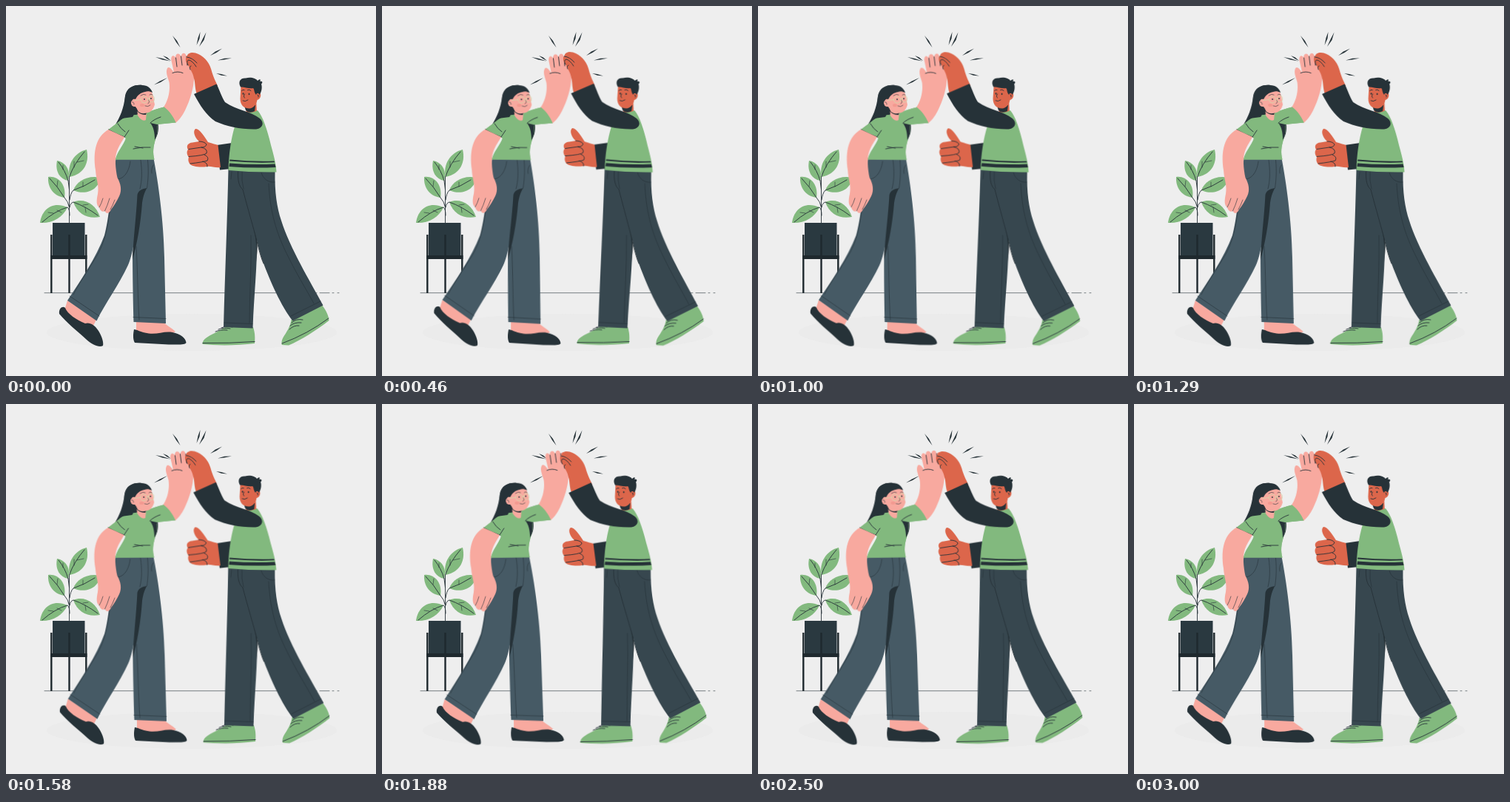
These frames come from a looping animation (500 px wide and 500 px high, 3.04 s). An HTML page:

```html
<!DOCTYPE html>
<html lang="en">
<head>
<meta charset="utf-8">
<title>High five</title>
<style>
html, body { margin: 0; width: 100%; height: 100%; overflow: hidden; background: #eee; }
svg { display: block; width: 100vw; height: 100vh; }
.sway { transform-box: view-box; }
.ink { fill: #263238; }
.line { fill: none; stroke: #263238; stroke-width: .9; stroke-linecap: round; stroke-linejoin: round; }
.thin { stroke-width: .6; }
.green { fill: #82b97e; }
.pink { fill: #f8a99f; }
.tan { fill: #dc664b; }
.denim { fill: #465a65; }
.slate { fill: #37474f; }
.stand { fill: none; stroke: #1f292e; stroke-width: 2.4; }
</style>
</head>
<body>
<svg viewBox="0 0 500 500">
  <defs>
    <pattern id="dots" width="13" height="12" patternUnits="userSpaceOnUse" patternTransform="rotate(12)">
      <g fill="none" stroke="#d3ebc9" stroke-width=".9">
        <circle cx="3" cy="3" r="1.5"/>
        <circle cx="9.5" cy="8.5" r="1.5"/>
      </g>
      <g fill="#c2e0b8">
        <circle cx="9.5" cy="2" r=".6"/>
        <circle cx="3.5" cy="8.8" r=".6"/>
      </g>
    </pattern>
  </defs>

  <ellipse cx="251" cy="441" rx="196" ry="25" fill="#ebebeb"/>
  <path class="line thin" d="M52 387.7H420M424 387.7H437M441 387.7H443M448 387.7H450"/>

  <g id="plant">
    <g class="green">
      <path d="M86 231C82 215 92 198 109 194C113 211 106 227 86 231Z"/>
      <path d="M69 209C80 211 88 221 84 236C73 234 66 224 69 209Z"/>
      <path d="M57 231C70 229 82 241 79 259C65 257 56 246 57 231Z"/>
      <path d="M91 249C95 237 111 228 127 232C126 247 109 257 91 249Z"/>
      <path d="M46 293C48 275 63 263 83 272C77 286 62 294 46 293Z"/>
      <path d="M91 265C105 259 121 267 127 285C111 288 97 282 91 265Z"/>
    </g>
    <path class="line" d="M85.500 293V231Q92 213 106 197M84 236Q80 222 71 211M85.500 248L84 236M85.500 272Q84 264 79 259Q70 244 59 233M86 262Q87 253 91 249Q106 244 120 235M86 283Q86 274 83 272Q66 277 49 292M86 272Q87 266 91 265Q108 271 124 283"/>
    <path class="line thin" d="M92 218L92 210M96 211L105 209M77 221L77 215M69 244L70 236M64 280L57 279M69 276L75 279M104 269L111 268M107 272L108 279M104 244L104 238"/>
    <rect x="63" y="293" width="43.500" height="44" fill="#2a3940"/>
    <path class="stand" d="M61.300 309V388M108.300 309V388M85.500 309V388"/>
    <path class="stand" d="M60 339.500H109.500" style="stroke-width:5"/>
  </g>

  <g id="sparks" class="ink">
    <path d="M202 69L212 71L222 74.500L211 72.500ZM212 67L218 69.500L223 74L217 71Z"/>
    <path d="M200 106.500L208 101.500L218 97L209 103Z"/>
    <path d="M225 40L231 47L235.500 56L230 49Z"/>
    <path d="M262.500 35L261.500 44L257.500 53L259.500 43ZM270.500 35.500L267.500 46L261 55L265.500 45Z"/>
    <path d="M276 67L283 61.500L292 57.500L284.500 63Z"/>
    <path d="M286 73.500L295 70.800L305 70.500L295 72.500Z"/>
    <path d="M284 91L291 92L299 94.500L291 93.700Z"/>
  </g>

  <g class="sway" data-pivot="162 262"><g transform="rotate(-.12 162 262)">
    <!-- hair behind -->
    <path class="ink" d="M184 107C173 106 163 110 161 122C159 139 154 150 148 160C156 160 164 156 176 149L196 152C199 160 201 170 201 181C206 174 207 164 205 157L190 146L180 110Z"/>

    <!-- feet -->
    <path class="pink" d="M83 398L122 424L117 434L100 430L79 411Z"/>
    <path class="ink" d="M72 416C71 408 77 405 80 408C83 416 95 424 107 429C113 427 120 431 125 439C130 447 132 455 131 459C126 462 117 458 109 451C97 440 82 428 72 416Z"/>
    <path class="pink" d="M176 426L213 427C217 432 224 435 229 440L220 445L176 443Z"/>
    <path class="ink" d="M173 437C177 437 181 441 193 442.500C205 444 214 439 225 441C236 443 243 449 243.500 455C242 458 236 457.500 220 457.500L174 455C171 450 172 442 173 437Z"/>

    <!-- trousers -->
    <path class="denim" d="M160 206H199.500C206 240 213 290 214 340L216 429L172.500 427C171.500 390 171 350 171 336L178 250Z"/>
    <path class="denim" d="M148.500 206C142 250 139 288 133 310C122 340 100 372 83 398L122.500 425.500C135 400 152 378 165 350C171 337 175 310 178 288L184 246L186 206Z"/>
    <path class="ink" d="M190.500 246C184 247 179 249 177.500 255C176 285 172 314 171 343C177 322 182 294 184 266C185.500 256 188 250 190.500 246Z"/>
    <path class="line thin" d="M182 208C184 222 184 236 181 247M191.500 208C193 224 192 236 190.500 246M150 234C158 234 166 226 168 210M143 252C139 290 136 318 120 342C108 362 98 376 91 390M86 392L126 419M172 420.500L216 422.500M176 325C178 360 178 395 180 424M199 215Q196 219 197 226"/>

    <!-- raised arm -->
    <path class="pink" d="M212 138C220 127 222 113 220.500 103C219 97 215 90 218 84C221 81 224 86 227 90L223.500 74C222 67 227 65 229 70C229 63 235 63 236.500 69C237 62 243 62 244 69C245 64 251 66 251.500 73L254 92C255 108 249 127 242 141C238 149 234 154 229 158Z"/>
    <path class="line" d="M225 90.500Q232 87.500 239 90.500M229.500 70L231 82M236.500 68L238 80M244 68L245 80"/>

    <!-- top -->
    <g id="top">
      <path id="blouse" class="green" d="M176 147C166 148 158 151 153 156L138.500 167C145 172 153 175 160 177L162 179C158 190 150 197 148 207.500H200.500C198 198 199 190 202 180C205 172 205 165 204 160L229.500 157.500C226 150 221 142 213.500 136.500C206 138 198 141 191 144Z"/>
      <use href="#blouse" style="fill:url(#dots)"/>
    </g>
    <path class="line" d="M172 193Q184 190 195 191M174 190Q180 191 185 192M151 159Q155 166 161 170M138.500 167Q149 173 160 177M160 177L166 168M209 150Q200 153 195 158"/>
    <path class="ink" d="M195 158L204 160C205 168 205 174 201 181C201 170 199 163 195 158Z"/>

    <!-- lowered arm -->
    <path class="pink" d="M138.500 167C122 176 117 196 121 222C122 236 126 242 124 254C122 263 122 270 126 272C127 277 131 279 133.500 277C136 282 140 280 142 275C146 270 150 263 153 257C157 249 155 240 150.500 232C148 220 146.500 205 150 196C153 188 157 183 160 177Z"/>
    <path class="line thin" d="M131 260Q129 267 126 272M140 260Q137 270 133.500 277M147 262Q144 270 141 275"/>

    <!-- head -->
    <path class="pink" d="M177 138L178 148Q184 157 189 154L190 143Z"/>
    <path class="ink" d="M176 138L179 143Q185 147 190 144L189 147Q181 147 177 142Z"/>
    <path class="pink" d="M175 115L196 115C200 121 199.500 128 201 133C199 141 194 145 188 144.500C182 144 177 140 175 136C169 137 167 130 171 127Z"/>
    <path class="ink" d="M161 122C163 110 174 106 184 107C191 107 196 111 198 117C194 115 191 115 188 116C182 117 178 120 175 126C171 125 168 128 169 132C171 137 172 139 174 140C173 144 173 148 171 150L156 152C160 140 160 132 161 122Z"/>
    <path class="line thin" d="M170.500 130Q173 129 173 133M182 121Q186 118 189 120M194 120Q196 118 198 120M193 127Q195 130 192 132M188 135Q192 137 195 134"/>
    <circle class="ink" cx="187" cy="126" r=".9"/>
    <circle class="ink" cx="196" cy="125" r=".9"/>
    <g fill="none" stroke="#d6d6ab" stroke-width=".9">
      <circle cx="187" cy="126.500" r="4.500"/>
      <ellipse cx="197" cy="125.500" rx="3.500" ry="4.300"/>
      <path d="M174 127.500L182.500 126.500M191.500 125.500L193.500 125"/>
    </g>
    <ellipse cx="184" cy="134" rx="3" ry="2" fill="#ee8d84" opacity=".55"/>
  </g></g>

  <g class="sway" data-pivot="340 260"><g transform="rotate(-.12 340 260)">
    <!-- shoes -->
    <g class="green">
      <path d="M265.500 457C265 450 274 446 282 442L298 433L334 434C337 443 336.500 450 336 456C312 459 285 459 265.500 457Z"/>
      <path d="M373 458C370 448 383 441 385.500 424L427 404C433 412 436 419 436.500 425C420 438 398 452 382 458.500Z"/>
    </g>
    <path class="line" d="M266 455.500Q302 456 336 453.500M373 456Q408 443 436 422M283 440Q290 437 299 438M287 437Q294 434 303 436M291 435Q297 432 306 434M384 432Q390 427 399 428M386 428Q392 422 401 424M383 437Q389 431 396 432"/>

    <!-- trousers -->
    <path class="slate" d="M300.500 220C299 290 296 360 294 434L333.500 435.500C335 390 340 350 339 310L350 222Z"/>
    <path class="slate" d="M314 222L363.500 224C363 252 366 272 372 290C384 328 410 370 428.500 404.500L387.500 425.500C372 406 357 372 347 345C340 325 336 300 322 247Z"/>
    <path class="line" d="M313.500 224C313 236 315 244 320 248C327 275 334 298 339 318Q344 339 348 348"/>
    <path class="ink" d="M335 302L339.500 319C340 330 339 338 338 346C339 330 338 315 335 302Z"/>
    <path class="line thin" d="M345 225C347 233 354 239 363 238M319 224Q318 236 321 247M305 224L304 234M295 428L333 429.500M385 419L425 399M331 310C332 350 329 390 329 428M355 240C357 285 369 315 383 342C396 368 407 385 416 402"/>

    <!-- thumb up -->
    <path class="ink" d="M285 188L309 184.500L304 220L289 221.500Z"/>
    <path class="tan" d="M256 166C261 165 268 176 273 184C279 186 284 187 286.500 188L290 218C283 219 276 216 272 217C262 218.500 252 217 249 214C246 211 246 207 247 204C244 201 244 196 246 194C243 189 246 185 252 184.500L261 183C255 178 252 169 256 166Z"/>
    <path class="line" d="M261 183Q268 183 271 187Q270 191 264 191L247 193.500M264 191Q273 193 271 199Q268 202 247 203.500M268 201Q275 204 272 209Q266 211 249 213M266 210Q273 212 272 217"/>

    <!-- neck and jumper -->
    <path class="tan" d="M324 130L338 124L339 145L325 147Z"/>
    <path class="green" d="M325 143C331 145 336 143 340 141C347 149 353 167 358 188C362 202 365 214 365.500 224.500Q332 225 300.500 222C301 200 304 180 309 163C313 152 319 146 325 143Z"/>
    <path class="ink" d="M302.500 207.500Q333 210.500 362.500 209.500L363 211.300Q333 212.500 302 209.500ZM302 212.500Q333 215 363.500 213.500L364.500 218Q333 219.500 301.500 217Z"/>

    <!-- raised arm -->
    <path class="tan" d="M244.500 68C246 62 254 62 260 65C269 69 276 78 278.500 90C281 98 284 103 286 108L258 119C255 112 256 104 254 98C253 91 249 86 247 81C242 76 242 71 244.500 68Z"/>
    <path class="line" d="M244.500 69Q252 70 258 77M246 80Q243 74 247 73Q252 74 257 82M249 86Q247 82 250 81"/>
    <path class="ink" d="M254 119L284.500 105.500C288 112 291 122 296 130C312 141 331 142 343 152C349 157 348 165 338 166.500C318 167 299 163 283 156C270 147 262 134 254 119Z"/>

    <!-- head -->
    <path class="ink" d="M322 135L337 134L336 142Q329 146 324 141Z"/>
    <path class="tan" d="M317.500 108L338 110L341 116C346 117 345 126 339.500 127C338 134 334 138 329 138.500C321 138 316.500 134 316.500 125Z"/>
    <path class="ink" d="M317 109.500C313 102 317 97 324 97.500C331 95.500 338 98 340 101C343 98 345 99 343 102C347 101 347 104 345 105.500C346.500 110 345.500 116 342.500 120C341 117 339 117 338 120C335 117 336 113 334 111C328 112 322 109 317 109.500Z"/>
    <path class="line" d="M318.500 114.500Q320 112.500 322 113.500M326.500 113.500Q329 112 331 114.500M322.500 119Q320 123 322.500 124M320 128Q323 130 327 127M340 120Q342 120 341 123"/>
    <g class="ink">
      <ellipse cx="320.500" cy="118.500" rx=".9" ry="1.200"/>
      <ellipse cx="328.500" cy="119" rx=".9" ry="1.200"/>
    </g>
  </g></g>
</svg>
<script>
const LOOP = 3040, LEAD = 90;
const steps = [[0, 0], [.25, 1], [.75, -1], [1, 0]];

for (const el of document.querySelectorAll('.sway')) {
  const [x, y] = el.dataset.pivot.split(' ');
  el.style.transformOrigin = `${x}px ${y}px`;
  el.animate(
    steps.map(([offset, deg]) => ({ offset, transform: `rotate(${deg}deg)` })),
    { duration: LOOP, delay: -LEAD, iterations: Infinity, easing: 'linear' }
  );
}
</script>
</body>
</html>
```
